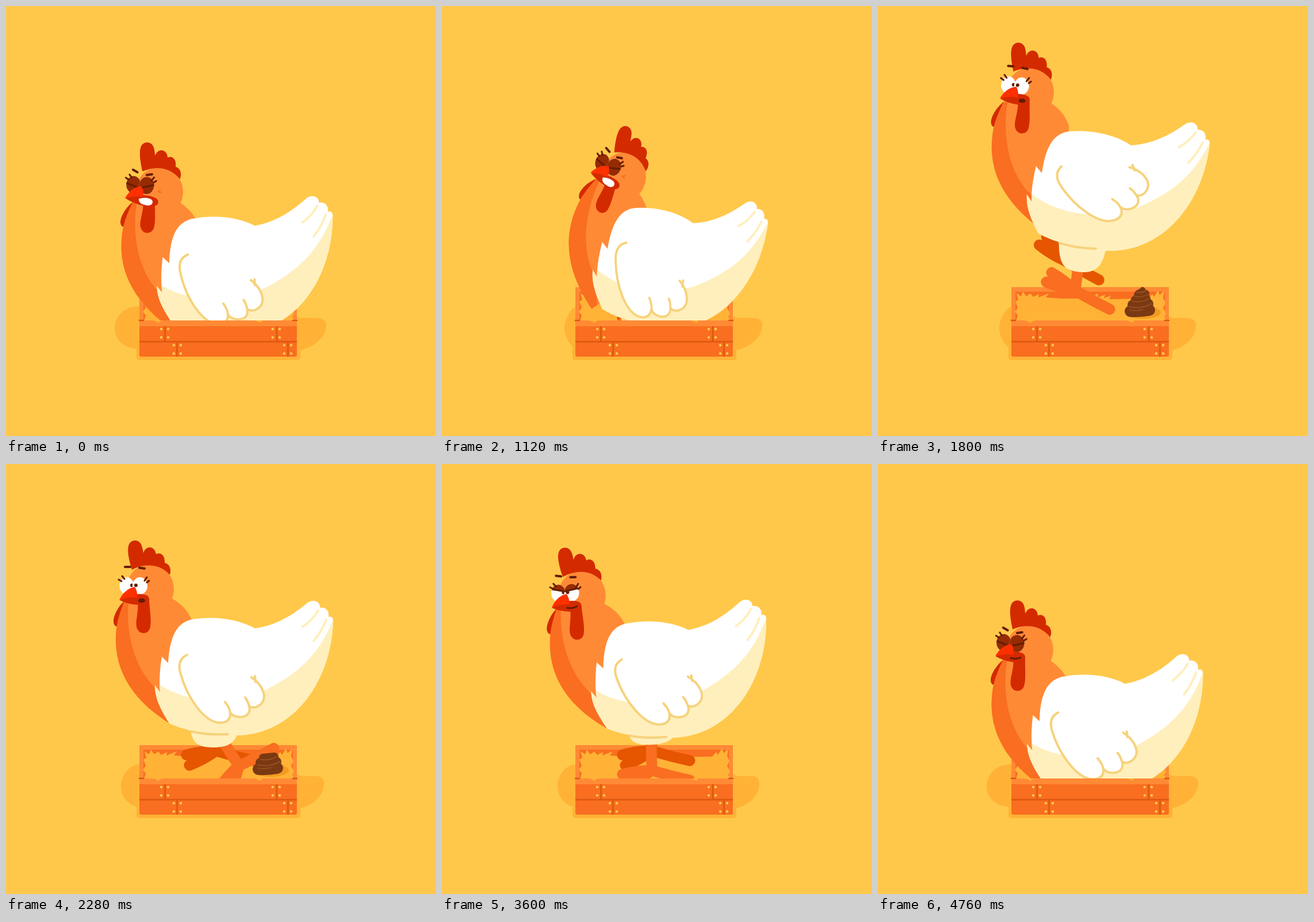
Recreate the animation shown at these times as an HTML page. Size 748 px wide and 748 px high, loop 4.8 s.

```html
<!DOCTYPE html>
<html lang="en">
<head>
<meta charset="utf-8">
<title>Hen in a crate</title>
<style>
  html, body { margin: 0; height: 100%; overflow: hidden; background: #ffc84a; }
  svg { display: block; width: 100%; height: 100%; }
  .line { fill: none; stroke-linecap: round; stroke-linejoin: round; }
  .light { fill: #ff8a36; } .orange { fill: #f96e20; } .red { fill: #d42a00; }
  .straw { fill: #ffb236; } .cream { fill: #ffefbc; }
  .gold { stroke: #f6d27c; stroke-width: 4; }
  .dark { stroke: #641c04; stroke-width: 3; }
  .brown { stroke: #7b3912; }
  .groove { stroke: #9d5423; stroke-width: 1.5; }
</style>
</head>
<body>
<svg viewBox="0 0 748 748">
  <defs>
    <clipPath id="bodyClip"><use href="#bodyShape"/></clipPath>
    <clipPath id="neckClip"><use href="#neckShape"/></clipPath>
    <clipPath id="eyeClip0"><ellipse cx="210" cy="212" rx="12.5" ry="15"/></clipPath>
    <clipPath id="eyeClip1"><ellipse cx="233" cy="212" rx="13" ry="15"/></clipPath>
  </defs>

  <g class="straw">
    <path id="shadeLeft"/>
    <path id="shadeRight"/>
    <rect x="227" y="540" width="285" height="76" rx="5"/>
  </g>

  <rect class="light" x="232" y="489" width="274" height="62"/>
  <rect class="orange" x="239" y="497" width="260" height="52"/>
  <path class="straw" d="M240 549L243 538 238 532 243 525 239 514 244 511 241 500 249 505 252 497 258 505 265 500 270 506 280 501 279 507 297 500 292 507 320 509 361 509 366 501 372 507 382 500 383 507 395 502 393 508 405 504 402 510 470 509 477 501 480 506 487 495 490 503 498 495 496 508 500 517 496 525 501 535 498 541 503 549Z"/>

  <g id="farLeg"></g>
  <g id="nearLeg"></g>

  <g id="pile" class="line">
    <ellipse cx="461" cy="533" rx="31" ry="11" fill="#f39b20"/>
    <path class="brown" stroke-width="20" d="M439 531Q455 532 472 529"/>
    <path class="groove" d="M438 529Q458 532 474 522"/>
    <g id="middle">
      <path class="brown" stroke-width="18" d="M443 520L470 518"/>
      <path class="brown" stroke-width="14" d="M447 511L467 509"/>
      <path class="groove" d="M437 523Q458 528 476 518M442 514Q460 517 472 508"/>
    </g>
    <g id="tip">
      <path class="brown" stroke-width="12" d="M451 503L466 500"/>
      <path fill="#7b3912" d="M447 501C445 494 455 494 457 490Q461 486 465 492Q468 496 468 501Z"/>
      <path class="groove" d="M446 505Q460 508 470 501M450 498Q458 500 466 495"/>
    </g>
  </g>
  <g id="chunks"></g>

  <g id="bird">
    <g id="neck">
      <path class="red" d="M206 238C195 248 186 265 187 275C188 283 193 284 198 281L220 240Z"/>
      <path id="neckShape" class="light" d="M211 215C211 187 233 175 250 175C275 175 292 195 292 217C292 226 290 231 289 234C305 243 318 257 323 272L320 400 284 451C224 413 191 365 191 305C191 275 200 255 207 235Z"/>
      <path class="orange" clip-path="url(#neckClip)" d="M213 238C207 310 232 370 270 398L300 460H170V240Z"/>
      <path class="red" d="M219 184C213 165 211 150 213 143C216 130 232 130 236 142C238 147 238 151 239 155C243 141 259 142 261 157C267 153 277 157 276 172C285 174 288 183 285 193C266 172 240 173 219 184Z"/>
      <g id="face">
        <path class="red" d="M229 238C231 258 225 272 227 283C230 298 249 298 251 283C253 270 250 255 249 236Z"/>
        <g id="eyes"></g>
        <path class="line dark" d="M196 201L201 204M202 195L206 200M241 203L245 197M245 206L249 203"/>
        <g id="brows" class="line dark" stroke-width="4">
          <path id="brow0" d="M-4 0H5" style="stroke-width:4"/>
          <path id="brow1" d="M-4 0H5" style="stroke-width:4"/>
        </g>
        <path id="lip" class="red" d="M198 237C210 226 239 223 247 230C253 238 246 245 230 245Q212 244 198 237Z"/>
        <path id="openMouth" fill="#641c04" d="M230 238C230 232 242 233 242 237C242 243 230 242 230 238Z"/>
        <path id="smirk" class="line dark" d="M224 238Q234 240 241 236"/>
        <g id="teeth">
          <path fill="#fff" d="M221 236C230 232 243 233 245 238C247 245 240 248 233 246Q221 245 221 236Z"/>
          <path class="line" stroke="#f96e20" stroke-width="2" d="M258 218L253 221 259 223"/>
        </g>
        <path fill="#ff3000" d="M197 237C202 225 213 215 224 214C228 220 229 227 228 232Q210 231 197 237Z"/>
      </g>
    </g>
    <path id="thigh" class="cream"/>
    <path id="bodyShape" fill="#fff" d="M282 346C285 300 297 275 325 270C365 264 405 270 433 286C470 281 500 262 525 241C536 234 547 240 546 250C555 248 563 255 561 266C567 264 570 268 569 276C564 385 495 472 400 472C350 472 310 463 284 451C268 425 259 407 259 385L268 397C266 375 268 355 271 335Z"/>
    <path class="cream" clip-path="url(#bodyClip)" d="M250 370C300 418 395 425 465 386C520 356 550 320 570 268L600 490H240Z"/>
    <path class="line gold" d="M322 465Q350 472 386 470"/>
    <path class="line" stroke="#ffefbc" stroke-width="4" d="M543 255Q533 272 516 283M557 271Q549 292 535 308"/>
    <g id="wing">
      <path fill="#fff" d="M315 332C302 338 299 350 304 366C315 405 345 452 375 450C387 449 391 441 390 432C397 445 424 444 423 421C432 428 449 419 449 404Q447 385 427 371Z"/>
      <path class="line gold" d="M315 332C302 338 299 350 304 366C315 405 345 452 375 450C394 448 394 430 381 414M390 432C397 445 432 444 422 418Q420 411 416 406M423 421C432 428 449 419 449 404Q447 385 427 371M434 379L433 369"/>
    </g>
  </g>

  <g id="crateFront">
    <rect class="light" x="232" y="547" width="274" height="12"/>
    <path class="orange" d="M232 557H506V607Q506 610 503 610H235Q232 610 232 607Z"/>
    <path class="straw" d="M255 547L262 549 265 552 267 549 273 547ZM432 547L438 549 444 551 445 547Z"/>
    <path class="line" stroke="#db5710" stroke-width="2.5" stroke-linecap="butt" d="M232 547H239M499 547H506M233 584H505M276.500 558V583M471 558V583M297.500 585V609M490.500 585V609"/>
    <g id="nails" fill="#ffc84a"></g>
  </g>
</svg>
<script>
const $ = id => document.getElementById(id);
const set = (id, name, value) => $(id).setAttribute(name, value);
const show = (id, on) => { $(id).style.display = on ? '' : 'none'; };
const move = (id, x, y, angle = 0, px = 0, py = 0, sx = 1) =>
  set(id, 'transform', `translate(${px + x} ${py + y}) rotate(${angle}) scale(${sx} 1) translate(${-px} ${-py})`);

for (const [x, y] of [[276, 562], [470, 562], [298, 590], [490, 590]])
  for (const dx of [-6, 6]) for (const dy of [0, 14.500])
    $('nails').innerHTML += `<circle cx="${x + dx}" cy="${y + dy}" r="2.3"/>`;

$('eyes').innerHTML = [[210, 219], [233, 226]].map(([x, pupil], i) => `
  <g clip-path="url(#eyeClip${i})">
    <rect x="${x - 15}" y="195" width="30" height="35" fill="#fff"/>
    <circle cx="${pupil}" cy="211" r="3" fill="#641c04"/>
    <g id="lower${i}"><rect x="-20" width="40" height="40" fill="#962b02"/></g>
    <g id="upper${i}"><rect x="-20" y="-40" width="40" height="40" fill="#962b02"/>
      <path class="line dark" d="M-18 0H18"/></g>
  </g>`).join('');

for (const [leg, color] of [['farLeg', '#e65500'], ['nearLeg', '#f96e20']])
  $(leg).innerHTML = `<g class="line" stroke="${color}" stroke-width="19">
    <path id="${leg}Shin"/>
    <g id="${leg}Foot"><path d="M0 0Q30 9 66 17"/>
      <path id="${leg}Toes" d="M-51 7Q-25 0 0 0Q-22 16 -46 25"/></g></g>`;

const kicks = [2285, 2640, 3050];
$('chunks').innerHTML = kicks.map((_, i) =>
  `<path id="chunk${i}" class="line brown" stroke-width="16" d="M-12 2Q0 -5 12 -1"/>`).join('');

// body: x, y, angle, width; neck: angle, x, y; face: x, y;
// legs: ankle x, y, foot angle, toe bend; eyes: upper lid, lower lid, frown
const stand = {
  body: [0, 0, 0, 1], neck: [0, 0, 0], face: [0, 0], wing: [0], thigh: [0],
  near: [365, 533, 0, 0], far: [365, 499, 0, 0], eyes: [-24, 24, 0], shade: [200, 553]
};
const pose = (base, changes) => ({ ...base, ...changes });
const shut = [2, 2, 1], sleepy = [-5, 24, .35];
const strain = pose(stand, {
  body: [3, 98, -2, 1], neck: [6, -1, 8], face: [-5, -4], wing: [5], thigh: [-25],
  near: [365, 545, 0, 0], far: [365, 535, 0, 0], eyes: shut, shade: [189, 557]
});
const push = pose(strain, { body: [-1, 98, -3, 1], neck: [3, -2, 7], wing: [1] });
const lean = pose(strain, { body: [-3, 86, 6, .95], neck: [16, -6, 8], wing: [9], shade: [213, 557] });
const look = pose(stand, {
  body: [0, -48, 4.500, 1], neck: [0, 0, -10], face: [2, -4], wing: [-23], thigh: [15],
  near: [343, 495, 14, 31], far: [325, 443, 15, 45], shade: [211, 553]
});
const leap = pose(look, { body: [2, -70, 4.500, 1], near: [343, 478, 14, 31], far: [328, 428, 15, 45] });
const rise = pose(leap, { body: [0, -52, 5, 1], wing: [-30] });
const kickNear = pose(stand, { near: [405, 525, -41, 0] });
const hop = pose(stand, { body: [0, -28, 0, 1], thigh: [12], near: [350, 508, 14, 20], far: [362, 488, -8, 0], shade: [199, 552] });
const kickFar = pose(stand, { far: [405, 500, -35, 0], eyes: [-20, 24, 0] });
const hopSly = pose(hop, { eyes: sleepy });
const lift = pose(stand, { body: [0, -14, 0, 1], thigh: [9], far: [365, 482, -17, 0], eyes: sleepy, shade: [199, 552] });
const sly = pose(kickFar, { eyes: sleepy });
const land = pose(stand, { body: [0, 5, -2.600, 1], wing: [-2], thigh: [-8], eyes: sleepy, shade: [201, 552] });
const rest = pose(strain, { body: [0, 98, -2, 1], wing: [0], eyes: sleepy });
const asleep = pose(rest, { eyes: shut });

const timeline = [
  [0, strain], [280, push], [600, strain], [1000, lean], [1160, lean], [1380, rise], [1700, leap],
  [1800, look], [1960, look], [2140, hop], [2280, kickNear], [2460, hop], [2640, kickFar], [2820, hopSly],
  [2960, lift], [3060, sly], [3210, lift], [3400, hopSly], [3600, land],
  [3900, rest], [4520, rest], [4740, asleep], [4800, asleep]
];

function poseAt(t) {
  const i = timeline.findIndex(([end]) => end > t);
  const [t0, a] = timeline[i - 1], [t1, b] = timeline[i];
  const k = (1 - Math.cos(Math.PI * (t - t0) / (t1 - t0))) / 2;
  const mix = {};
  for (const part in a) mix[part] = a[part].map((v, j) => v + (b[part][j] - v) * k);
  return mix;
}

function drawLeg(name, [x, y, angle, bend], [bx, by, turn]) {
  const r = turn * Math.PI / 180;
  const hipX = 380 + bx - 20 * Math.cos(r) - 75 * Math.sin(r);
  const hipY = 380 + by - 20 * Math.sin(r) + 75 * Math.cos(r);
  set(name + 'Shin', 'd', `M${hipX} ${hipY}L${x} ${y}`);
  move(name + 'Foot', x, y, angle);
  move(name + 'Toes', 0, 0, bend);
}

function render(t) {
  const p = poseAt(t);
  const [x, y, turn, width] = p.body, [nod, nx, ny] = p.neck;
  const [upper, lower, frown] = p.eyes, [left, right] = p.shade;
  const shake = t < 1160 ? 1.500 * Math.sin(t * Math.PI / 80) : 0;
  const straining = t < 1200, amazed = !straining && t < 2680;

  move('bird', x + shake, y, turn, 380, 380, width);
  move('neck', nx, ny, nod, 300, 400);
  move('face', ...p.face);
  move('wing', 0, 0, p.wing[0], 315, 332);
  const low = 497 + p.thigh[0] * 1.300;
  set('thigh', 'd', `M321 460C323 ${low - 7} 340 ${low - 4} 362 ${low - 4}C385 ${low - 4} 402 ${low - 12} 404 460Z`);
  drawLeg('farLeg', p.far, p.body);
  drawLeg('nearLeg', p.near, p.body);

  [210, 233].forEach((cx, i) => {
    const tilt = (i ? -8 : 9) * (1 + frown);
    move('upper' + i, cx, 212 + upper, tilt);
    move('lower' + i, cx, 212 + lower, tilt);
  });
  move('brow0', 211, 179 + 9 * frown, 26 * frown);
  move('brow1', 236, 181 + 12 * frown, 8 - 20 * frown);
  move('lip', 0, 0, straining ? 5 : 0, 198, 237, straining ? 1.120 : 1);
  show('teeth', straining);
  show('openMouth', amazed);
  show('smirk', !straining && !amazed);

  show('pile', t >= 1240 && t < kicks[2]);
  show('tip', t < 2270);
  show('middle', t < kicks[1]);
  kicks.forEach((start, i) => {
    const k = (t - start) / 300;
    show('chunk' + i, k >= 0 && k < 1);
    move('chunk' + i, 462 + 320 * k, 505 + i * 10 - 260 * k + 200 * k * k, 400 * k);
  });

  set('shadeLeft', 'd', `M235 522C${left + 15} 522 ${left} 541 ${left} 560C${left} 581 ${left + 16} 597 235 597Z`);
  set('shadeRight', 'd', `M505 541C525 546 ${right} 536 ${right} 555C${right} 580 530 597 505 600Z`);
}

function tick() {
  render(performance.now() % 4800);
  requestAnimationFrame(tick);
}
tick();
</script>
</body>
</html>
```
